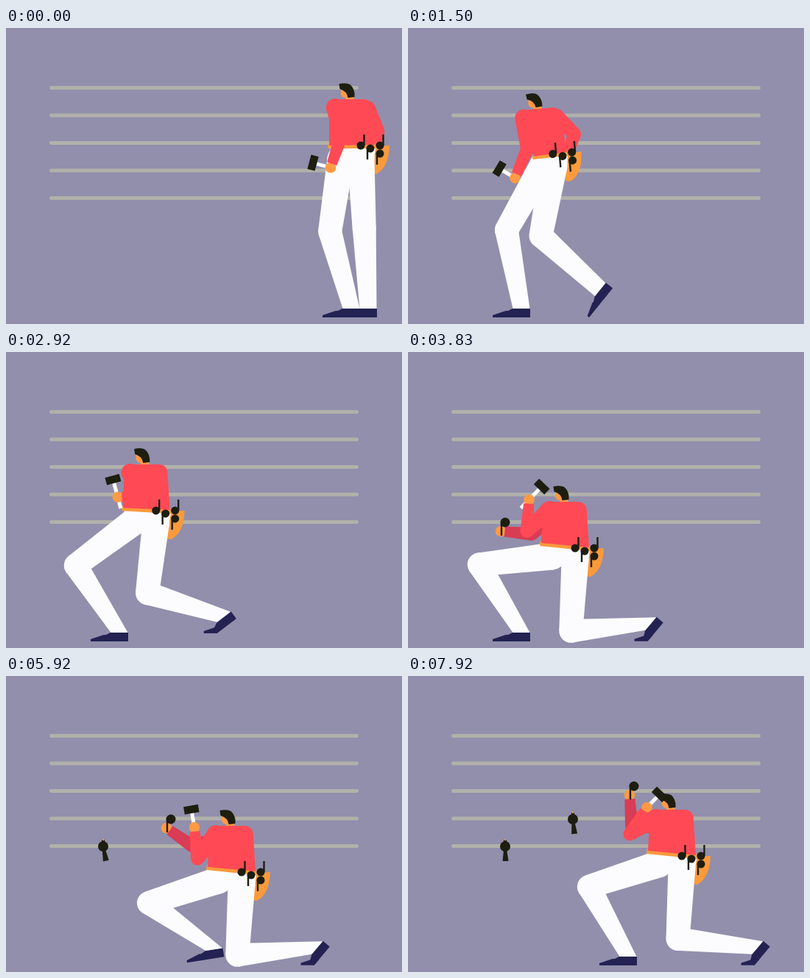
An HTML page with a canvas that plays this animation: 538x403 px, repeating every 8 s.

```html
<!DOCTYPE html>
<html lang="en">
<head>
<meta charset="utf-8">
<title>Hanging notes on a stave</title>
<style>
  html, body { margin: 0; width: 100%; height: 100%; overflow: hidden; background: #918fac; }
  canvas { display: block; }
</style>
</head>
<body>
<canvas id="stage" width="538" height="403"></canvas>
<script>
const ctx = document.getElementById('stage').getContext('2d');
const LOOP = 8000, FPS = 12, FLOOR = 394;
const C = {
  wall: '#918fac', stave: '#b1b1aa', shirt: '#ff4a55', shade: '#d93c55', skin: '#ff9a45',
  belt: '#f99a3c', white: '#fcfcfe', shoe: '#232252', ink: '#1d1d10'
};

// One job per note: where it hangs, where the hip kneels, when it is fetched and let go.
const jobs = [
  { note: [132, 232], hip: [227, 267], reach: 2330, set: 4200 },
  { note: [224, 195], hip: [320, 267], reach: 4830, set: 5970 },
  { note: [307, 150], hip: [372, 245], reach: 7080, set: 8294 }
];
for (const j of jobs) j.aim = [j.note[0] - j.hip[0], j.note[1] - j.hip[1]];

// Pelvis: left waist, left hip joint, tilt.
const STAND = [-45, 1, -27, 18, 0];
const LUNGE = [-28, 2, -15, 15, -5];
const KNEEL = [-48, -6, -31, 11, 0];

const rad = d => d * Math.PI / 180;
const mix = (a, b, k) => a + (b - a) * k;
const blend = (a, b, k) => a.map((v, i) => mix(v, b[i], k));
const clamp01 = k => Math.min(1, Math.max(0, k));
const part = (t, a, b) => clamp01((t - a) / (b - a));
const ramp = (t, a, b) => { const k = part(t, a, b); return k * k * (3 - 2 * k); };
const arc = (t, a, b) => Math.sin(Math.PI * part(t, a, b));
const turn = ([x, y], deg) => {
  const c = Math.cos(rad(deg)), s = Math.sin(rad(deg));
  return [x * c - y * s, x * s + y * c];
};

// How far along the row of jobs, as 0..2, moving around each release.
const progress = (t, before, after) =>
  ramp(t, jobs[0].set + before, jobs[0].set + after) +
  ramp(t, jobs[1].set + before, jobs[1].set + after);
const along = (key, p) => {
  const i = Math.min(1, Math.floor(p));
  return blend(jobs[i][key], jobs[i + 1][key], p - i);
};

// Middle joint of a two-part limb; side picks the bend direction.
function joint([ax, ay], [bx, by], l1, l2, side) {
  const dx = bx - ax, dy = by - ay, d = Math.hypot(dx, dy) || 1;
  const far = d >= l1 + l2;
  const run = far ? d * l1 / (l1 + l2) : (l1 * l1 - l2 * l2 + d * d) / (2 * d);
  const out = far ? 0 : side * Math.sqrt(Math.max(0, l1 * l1 - run * run));
  return [ax + (dx * run - dy * out) / d, ay + (dy * run + dx * out) / d];
}

// A walking step: peel the heel, swing the toe forward, set the foot flat.
function stride(t, start, end, dx) {
  const k = part(t, start, end);
  return {
    x: dx * ramp(k, 0.45, 1),
    y: -14 * arc(k, 0.45, 1),
    angle: -51 * ramp(k, 0, 0.35) * (1 - ramp(k, 0.5, 1))
  };
}

function poseAt(t) {
  const walk = ramp(t, 300, 1700), kneel = ramp(t, 2580, 3250);
  const lunge = ramp(t, 200, 1250) * (1 - ramp(t, 1550, 2000));
  const p = progress(t, 80, 500), aim = along('aim', p), goal = along('hip', p);
  const upright = [482 - 302 * walk, 160 + 4 * walk + 11 * arc(t, 300, 1900)];
  const hip = blend(upright, goal, kneel);

  const lead = progress(t, -350, 100), swing = Math.sin(Math.PI * (lead % 1));
  const l = stride(t, 560, 1480, -315);
  const footL = {
    x: 430 + l.x + along('hip', lead)[0] - jobs[0].hip[0],
    y: FLOOR + l.y - 5 * swing, angle: l.angle - 12 * swing, bend: 0
  };

  const r1 = stride(t, 0, 1000, -207), r2 = stride(t, 1230, 2000, -98);
  const back = ramp(t, 2580, 3080);
  const footR = {
    x: 453 + r1.x + r2.x + 166 * back + goal[0] - jobs[0].hip[0],
    y: FLOOR + r1.y + r2.y + 13.6 * back - 12 * arc(t, 2580, 3080),
    angle: r1.angle + r2.angle - 50 * back, bend: 50 * back
  };

  const job = jobs.find(j => t < j.set + 400);
  const release = 1 - ramp(t, job.set, job.set + 350);
  const reach = ramp(t, job.reach - 250, job.reach) * release;
  const lift = ramp(t, job.reach + 80, job.set - 850) * release;
  const rest = [15, 22 - 8 * Math.max(lunge, kneel)];
  const farHand = blend(blend(rest, [34, -11], reach), [aim[0] - 6, aim[1] + 12], lift);
  const farShoulder = blend([9, -50], [-34, -42], lift);

  const hitting = t > job.set - 750 && t < job.set;
  const beat = (t - job.set + 127) / 500;
  const hit = hitting ? Math.max(0, Math.cos(2 * Math.PI * beat)) : 0;
  const carried = blend([-41, 30, 195], [-54, 28, 216], lunge);
  const raised = [aim[0] / 2 - 15, -66, 314];
  const [hx, hy, angle] = blend(carried, raised, kneel);
  const hammer = [mix(hx, aim[0] + 30, hit * hit), mix(hy, aim[1] + 20, hit * hit), mix(angle, 225, hit)];

  const held = t >= job.reach - 80 && t < job.set;
  const pelvis = blend(blend(STAND, LUNGE, lunge), KNEEL, kneel);
  return { hip, pelvis, footL, footR, farShoulder, farHand, hammer, held, lift };
}

function poly(color, ...pts) {
  ctx.fillStyle = color;
  ctx.beginPath();
  pts.forEach(p => ctx.lineTo(p[0], p[1]));
  ctx.closePath();
  ctx.fill();
}

function disc(color, x, y, r) {
  ctx.fillStyle = color;
  ctx.beginPath();
  ctx.arc(x, y, r, 0, 7);
  ctx.fill();
}

function shape(color, d) {
  ctx.fillStyle = color;
  ctx.fill(new Path2D(d));
}

function line(color, width, x1, y1, x2, y2, cap = 'butt') {
  ctx.strokeStyle = color;
  ctx.lineWidth = width;
  ctx.lineCap = cap;
  ctx.beginPath();
  ctx.moveTo(x1, y1);
  ctx.lineTo(x2, y2);
  ctx.stroke();
}

function placed(x, y, deg, draw) {
  ctx.save();
  ctx.translate(x, y);
  ctx.rotate(rad(deg));
  draw();
  ctx.restore();
}

// Tapered bone with a round start; the end is cut square or along a given axis.
function bone(color, [ax, ay], ra, [bx, by], rb, cut) {
  const d = Math.hypot(bx - ax, by - ay) || 1, n = [(ay - by) / d, (bx - ax) / d];
  const e = cut || n;
  disc(color, ax, ay, ra);
  poly(color, [ax + n[0] * ra, ay + n[1] * ra], [bx + e[0] * rb, by + e[1] * rb],
    [bx - e[0] * rb, by - e[1] * rb], [ax - n[0] * ra, ay - n[1] * ra]);
}

function arm(color, shoulder, hand, upper, lower, r) {
  const elbow = joint(shoulder, hand, upper, lower, -1);
  disc(C.skin, hand[0], hand[1], 7.3);
  bone(color, shoulder, r, elbow, 9);
  bone(color, elbow, 9, blend(hand, elbow, 0.13), 7);
}

function leg(hip, foot, thigh) {
  const [tx, ty] = turn([-39, 12], foot.angle);
  const ankle = [foot.x - tx, foot.y - ty];
  const knee = joint(hip, ankle, thigh, 109, 1);
  placed(ankle[0], ankle[1], foot.angle, () => {
    poly(C.shoe, [-12, 0], [12, 0], [12, 12], [-21, 12], [-22, 5]);
    placed(-21, 12, foot.bend, () => poly(C.shoe, [0, 0], [-18, 0], [-18, -3], [0, -9], [7, -8]));
  });
  bone(C.white, hip, 18.5, knee, 16);
  bone(C.white, knee, 16, ankle, 11.5, turn([-1, 0], foot.angle));
}

function note(r, up, length) {
  disc(C.ink, 0, 0, r);
  const x = up ? r - 1 : 1.5 - r;
  line(C.ink, 2.4, x, 0, x, up ? -length : length);
}

function hungNote(job, t) {
  const s = (t - job.set - 800) / 1000;
  placed(...job.note, 0, () => {
    if (s < 0) return note(6.5, false, 18);
    const sway = -32 * Math.exp(-s) * Math.cos(2 * Math.PI * s);
    ctx.fillStyle = C.ink;
    ctx.fillRect(-2, -9, 4, 4);
    disc(C.belt, 0, -9, 1.2);
    disc(C.ink, 0, 0, 7);
    placed(0, 0, sway, () => poly(C.ink, [-2, 4], [2, 4], [4, 20], [-4, 20]));
  });
}

function torso(wx, wy) {
  poly(C.belt, [wx + 1, wy - 4], [20, -3], [20, 4], [wx, wy + 3]);
  ctx.fillStyle = C.shirt;
  ctx.beginPath();
  ctx.moveTo(wx + 2, wy - 1);
  ctx.arcTo(-43, -63, 15, -63, 11);
  ctx.arcTo(15, -63, 19, -2, 11);
  ctx.lineTo(19, -1);
  ctx.fill();
}

function head() {
  placed(-29.5, -85, 0, () => {
    shape(C.skin, 'M3 7L2 15L5 19L9 20L8 23L20 23L20 8Z');
    shape(C.ink, 'M0 1Q10 -1 15 2Q22 8 21 19L12 20Q11 11 1 8Z');
  });
}

function beltNotes() {
  for (const [x, y, up] of [[0, 0, true], [13, 4, false], [26, 0, true], [26, 11, false]])
    placed(x, y, 0, () => note(5.5, up, 15));
}

function hammer([x, y, angle]) {
  placed(x, y, angle, () => {
    line(C.white, 5, -16, 0, 22, 0);
    ctx.fillStyle = C.ink;
    ctx.fillRect(19.5, -10, 10.5, 20);
  });
}

function man(t) {
  const pose = poseAt(t);
  const [wx, wy, lx, ly, tilt] = pose.pelvis;
  const [hipX, hipY] = pose.hip, [fx, fy] = pose.farHand;
  const upper = draw => placed(hipX, hipY, tilt, draw);
  const world = (x, y) => {
    const [dx, dy] = turn([x, y], tilt);
    return [hipX + dx, hipY + dy];
  };

  upper(() => {
    arm(fx < -20 ? C.shade : C.shirt, pose.farShoulder, pose.farHand, 34, 42, 11);
    shape(C.belt, 'M16 1L39 0Q38 30 21 39L14 38Z');
    if (pose.held)
      placed(fx + 6, fy + mix(8, -12, pose.lift), mix(121, 0, pose.lift), () => note(6.5, false, 18));
  });

  const hipL = world(lx, ly), hipR = world(0, 16);
  leg(hipR, pose.footR, 97);
  leg(hipL, pose.footL, 100);
  poly(C.white, world(wx, wy), world(20, 4), world(18, 18), hipR, hipL);

  upper(() => {
    head();
    torso(wx, wy);
    beltNotes();
    hammer(pose.hammer);
    arm(C.shirt, [-35, -52], pose.hammer, 42, 43, 12);
  });
}

function draw(t) {
  ctx.fillStyle = C.wall;
  ctx.fillRect(0, 0, 538, 403);
  for (let i = 0; i < 5; i++) {
    const y = 81.5 + i * 37.5;
    line(C.stave, 5, 61.5, y, 476.5, y, 'round');
  }
  jobs.filter(j => t >= j.set).forEach(j => hungNote(j, t));
  man(t);
}

function tick() {
  const ms = performance.now() % LOOP;
  const step = Math.min(LOOP * FPS / 1000 - 1, Math.floor((ms + 4) * FPS / 1000));
  draw(step * 1000 / FPS);
  requestAnimationFrame(tick);
}
tick();
</script>
</body>
</html>
```
